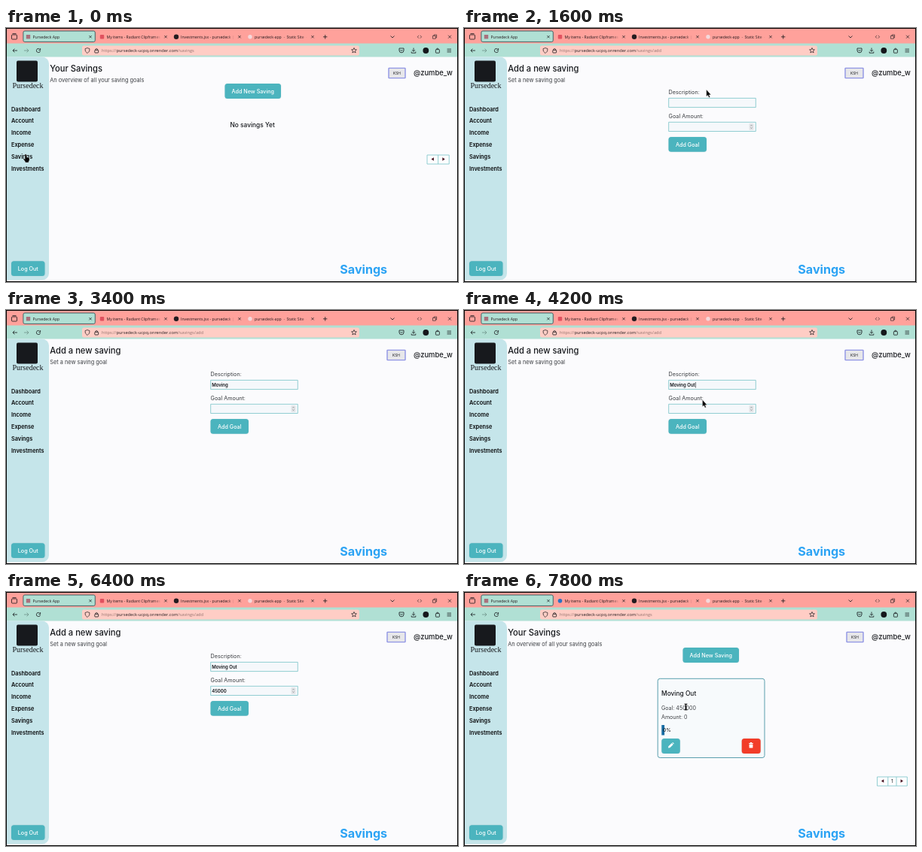
An HTML page with a canvas that plays this animation: 600x338 px, repeating every 8000 ms.

```html
<!DOCTYPE html>
<html lang="en">
<head>
<meta charset="utf-8">
<title>Savings walkthrough</title>
<style>
  html, body { margin: 0; width: 100%; height: 100%; overflow: hidden; background: #000; }
  canvas { display: block; width: 600px; height: 338px; }
</style>
</head>
<body>
<canvas id="stage"></canvas>
<script>
const W = 600, H = 338, LOOP = 8000, STEP = 200;
const canvas = document.getElementById('stage');
const ctx = canvas.getContext('2d');
const dpr = Math.max(1, window.devicePixelRatio || 1);
canvas.width = Math.round(W * dpr);
canvas.height = Math.round(H * dpr);

const UI = 'Inter, sans-serif';
const CHROME = '"Open Sans", "Noto Sans", sans-serif';
const C = {
  pink: '#ffa19b', bar: '#ffcdc5', mint: '#b0e0d4', side: '#c5e5ea', page: '#fbfbfd',
  teal: '#4bb4be', blue: '#176ca3', ink: '#16181c', soft: '#3c3f43',
  line: '#86c9cd', red: '#f23d29'
};
const HOST = 'pursedeck-ucpq.onrender.com';

// Pointer path: time, x, y
const PATH = [
  [0, 26, 169], [200, 26, 169], [800, 322, 80], [1400, 322, 80],
  [2400, 319.5, 99], [3800, 319.5, 99], [4200, 316.5, 119.5],
  [4600, 316, 131], [6400, 316, 131], [7200, 294.5, 153], [LOOP, 294.5, 153]
];

const clamp = (v, lo, hi) => Math.min(hi, Math.max(lo, v));
const between = (t, a, b) => t >= a && t < b;

function rect(x, y, w, h, fill, r = 0, stroke, lw = 1) {
  ctx.beginPath();
  ctx.roundRect(x, y, w, h, r);
  if (fill) { ctx.fillStyle = fill; ctx.fill(); }
  if (stroke) { ctx.strokeStyle = stroke; ctx.lineWidth = lw; ctx.stroke(); }
}

function disc(x, y, r, fill) {
  ctx.beginPath();
  ctx.arc(x, y, r, 0, Math.PI * 2);
  ctx.fillStyle = fill;
  ctx.fill();
}

function text(s, x, y, size, { color = C.ink, weight = 400, font = UI, align = 'left' } = {}) {
  ctx.font = `${weight} ${size}px ${font}`;
  ctx.textAlign = align;
  ctx.fillStyle = color;
  ctx.fillText(s, x, y);
  return ctx.measureText(s).width;
}

// Open or closed polyline from a flat list of coordinates
function poly(pts, { fill, stroke, lw = 0.8, close = false } = {}) {
  ctx.beginPath();
  for (let i = 0; i < pts.length; i += 2) ctx.lineTo(pts[i], pts[i + 1]);
  if (close) ctx.closePath();
  if (fill) { ctx.fillStyle = fill; ctx.fill(); }
  if (stroke) { ctx.strokeStyle = stroke; ctx.lineWidth = lw; ctx.stroke(); }
}

function arc(x, y, r, a, b, lw = 0.8) {
  ctx.beginPath();
  ctx.arc(x, y, r, a, b);
  ctx.strokeStyle = C.ink;
  ctx.lineWidth = lw;
  ctx.stroke();
}

function cross(x, y, r) {
  poly([x - r, y - r, x + r, y + r], { stroke: C.ink, lw: 0.7 });
  poly([x - r, y + r, x + r, y - r], { stroke: C.ink, lw: 0.7 });
}

function button(label, x, y, w, h, fill = C.teal) {
  ctx.save();
  ctx.shadowColor = 'rgba(40,110,125,.2)';
  ctx.shadowBlur = 1.5 * dpr;
  rect(x, y, w, h, fill, 3.5);
  ctx.restore();
  if (label) text(label, x + w / 2, y + h / 2 + 2.6, 7.2, { color: '#fff', weight: 500, align: 'center' });
}

function tab(title, x, end, icon) {
  icon(x);
  ctx.save();
  ctx.beginPath();
  ctx.rect(x + 5, 5, end - x - 5, 14);
  ctx.clip();
  const fade = ctx.createLinearGradient(end - 10, 0, end, 0);
  fade.addColorStop(0, '#24191c');
  fade.addColorStop(1, 'rgba(36,25,28,0)');
  text(title, x + 6, 13.9, 5.15, { color: fade, font: CHROME });
  ctx.restore();
  cross(end + 6, 11.7, 1.7);
}

function tabBar(t) {
  rect(1, 1, 598, 20, C.pink);
  rect(7.5, 9, 7, 6, null, 1, C.ink, 0.8);
  poly([8.5, 7.6, 13.5, 7.6], { stroke: C.ink });
  rect(22.9, 4, 95.4, 14.4, C.mint, 2, '#35575c', 0.9);
  tab('Pursedeck App', 29.5, 106, x => rect(x - 2.7, 9, 5.4, 5.4, '#a8707c'));
  tab('My items - Radiant Clipframes', 127.5, 206, x =>
    t < 7600 ? rect(x - 2.7, 9, 5.4, 5.4, '#e0525f', 1) : disc(x, 11.8, 2.8, '#2b72c4'));
  tab('Investments.jsx - pursedeck | Git', 226, 304, x => disc(x, 11.8, 3.2, '#231c20'));
  tab('pursedeck-app  ·  Static Site  ·', 324, 401, x => disc(x, 11.8, 2.7, '#f4d9dc'));
  poly([421, 11.8, 426.4, 11.8], { stroke: C.ink });
  poly([423.7, 9.1, 423.7, 14.5], { stroke: C.ink });
  poly([510.5, 10.5, 513, 13, 515.5, 10.5], { stroke: C.ink });
  poly([548, 9.9, 546.2, 11.8, 548, 13.7], { stroke: C.ink, lw: 0.6 });
  poly([549.8, 9.9, 551.6, 11.8, 549.8, 13.7], { stroke: C.ink, lw: 0.6 });
  rect(566.5, 10.4, 3.8, 3.8, null, 0, C.ink, 0.6);
  poly([568, 10.4, 568, 9, 571.6, 9, 571.6, 12.8, 570.3, 12.8], { stroke: C.ink, lw: 0.6 });
  cross(589, 11.7, 2);
}

function arrow(x, y, dir, color) {
  poly([x - 3 * dir, y, x + 3 * dir, y], { stroke: color });
  poly([x + 0.6 * dir, y - 2.4, x + 3 * dir, y, x + 0.6 * dir, y + 2.4], { stroke: color });
}

function toolBar(path) {
  rect(1, 20.5, 598, 18, C.mint);
  arrow(12, 30, -1, C.ink);
  arrow(27, 30, 1, '#6d9188');
  arc(43, 30, 2.6, 0.2, 5.4);
  poly([45.6, 27, 45.6, 29.4, 43.4, 29.4], { stroke: C.ink });
  rect(101, 23.5, 368, 13, C.bar, 2.5);
  poly([105, 27.6, 108, 26.5, 111, 27.6, 110.6, 31, 108, 33.6, 105.4, 31], { stroke: C.ink, lw: 0.7, close: true });
  rect(117.8, 29.4, 4.8, 3.6, null, 0.6, C.ink, 0.8);
  arc(120.2, 29.2, 1.6, Math.PI, 0);
  const grey = { color: '#94736f', font: CHROME };
  let x = 127;
  x += text('https://', x, 32.1, 5.7, grey);
  x += text(HOST, x, 32.1, 5.7, { color: '#2c2224', font: CHROME });
  text(path, x, 32.1, 5.7, grey);
  const star = [];
  for (let i = 0; i < 10; i++) {
    const r = i % 2 ? 1.6 : 3.6, a = i * Math.PI / 5 - Math.PI / 2;
    star.push(462 + r * Math.cos(a), 30 + r * Math.sin(a));
  }
  poly(star, { stroke: C.ink, lw: 0.7, close: true });
  poly([522, 30, 522, 27, 528, 27, 528, 30], { stroke: C.ink });
  arc(525, 29.8, 3, 0, Math.PI);
  poly([523.5, 29, 525, 30.6, 526.5, 29], { stroke: C.ink });
  poly([541, 26.5, 541, 31], { stroke: C.ink });
  poly([539, 29.2, 541, 31.2, 543, 29.2], { stroke: C.ink });
  poly([538.2, 31.5, 538.2, 33.2, 543.8, 33.2, 543.8, 31.5], { stroke: C.ink });
  disc(557.3, 30, 3.9, '#15171b');
  rect(570.4, 28.6, 5, 4.6, null, 0.6, C.ink, 0.8);
  arc(572.8, 28.4, 1.3, Math.PI, 0);
  for (let i = -1; i < 2; i++) poly([585.5, 30 + i * 2, 591, 30 + i * 2], { stroke: C.ink, lw: 0.7 });
}

function sideBar() {
  rect(1, 38.5, 56, 297, C.side, [0, 9, 9, 0]);
  rect(14, 43.5, 28, 28, '#17191d', 2);
  text('Pursedeck', 29, 79.8, 10, { font: '"Liberation Serif", serif', align: 'center' });
  ['Dashboard', 'Account', 'Income', 'Expense', 'Savings', 'Investments']
    .forEach((s, i) => text(s, 7, 110.5 + i * 15.8, 7.35, { color: '#090a0c', weight: 600 }));
  button('Log Out', 7, 310.3, 44.5, 19.8);
}

function header(title, sub, selectX) {
  text(title, 58.3, 58, 11.15, { weight: 500 });
  text(sub, 58.3, 72.2, 7.35, { color: C.soft });
  rect(selectX, 53.4, 530 - selectX, 13.2, '#e7e7ea', 0.5, '#8f94e4', 1.4);
  text('KSH', (selectX + 530) / 2, 61.8, 4.8, { align: 'center' });
  text('@zumbe_w', 541, 63.1, 9.4, { weight: 500 });
}

function pager(x, y, cells) {
  const total = cells.reduce((a, b) => a + b, 0);
  rect(x, y, total, 12, '#fdfdfe', 0, C.line, 0.9);
  let edge = x;
  cells.slice(0, -1).forEach(w => {
    edge += w;
    poly([edge, y, edge, y + 12], { stroke: C.line, lw: 0.9 });
  });
  const tri = (cx, d) => poly([cx - 1.6 * d, y + 3.2, cx + 1.8 * d, y + 5.5, cx - 1.6 * d, y + 7.8],
    { fill: '#451020', close: true });
  tri(x + cells[0] / 2, -1);
  tri(x + total - cells[cells.length - 1] / 2, 1);
  if (cells.length > 2) text('1', x + cells[0] + cells[1] / 2, y + 8.3, 6.6, { align: 'center' });
}

function card() {
  rect(257.2, 115.3, 141.8, 105.2, '#f7fafc', 3, '#5a9fae', 1);
  text('Moving Out', 262, 137.6, 8.4, { weight: 500 });
  text('Goal: 450000', 262, 157, 7.1, { color: C.soft });
  text('Amount: 0', 262, 169.3, 7.1, { color: C.soft });
  rect(262.3, 177, 3.8, 13.5, C.blue);
  text('0%', 264, 186, 6.8);
  button('', 262.3, 195, 24.5, 20);
  poly([271, 207.6, 271.5, 205.3, 275.8, 201, 277.7, 202.9, 273.4, 207.2], { fill: '#fff', close: true });
  poly([276.3, 200.5, 277.1, 199.9, 278.8, 201.6, 278.2, 202.4], { fill: '#fff', close: true });
  button('', 368.7, 195, 25, 20, C.red);
  rect(378.2, 201, 5.6, 1, '#fff');
  rect(379.9, 200, 2.2, 1, '#fff');
  rect(378.6, 202.6, 4.8, 5, '#fff', 0.7);
}

function field(label, y, value, focused) {
  text(label, 271.5, y - 5.8, 7.25, { color: C.soft });
  rect(271.7, y, 115.6, 12.2, '#f5f8fb', 0, C.line, 0.9);
  const w = text(value, 273.2, y + 8.4, 6, { weight: 600 });
  if (focused) rect(273.6 + w, y + 2.6, 0.6, 7.4, C.ink);
}

function spinner(x, y) {
  rect(x - 3, y - 4.5, 6, 9, '#e3e5e8', 1.2);
  poly([x - 1.2, y - 1, x, y - 2.3, x + 1.2, y - 1], { stroke: '#6a6c70', lw: 0.6 });
  poly([x - 1.2, y + 1, x, y + 2.3, x + 1.2, y + 1], { stroke: '#6a6c70', lw: 0.6 });
}

function listPage(t, saved) {
  const hover = between(t, 800, 1600);
  header('Your Savings', 'An overview of all your saving goals', saved || t < 400 ? 508 : 506);
  button('Add New Saving', 290.5, 74, 74.5, 20, hover ? C.blue : C.teal);
  if (saved) {
    card();
    pager(548.5, 246, [14.3, 11.2, 14.3]);
  } else {
    text('No savings Yet', 297.5, 132, 8.35, { weight: 500 });
    pager(559, 169, [14.6, 14.6]);
  }
}

function formPage(t) {
  const name = 'Moving Out'.slice(0, clamp(Math.floor((t - 2800) / 100), 0, 10));
  const goal = '450000'.slice(0, clamp(Math.floor((t - 4800) / 300), 0, 6));
  const caret = t % 1000 < 400;
  header('Add a new saving', 'Set a new saving goal', 506);
  field('Description:', 93.4, name, caret && between(t, 2800, 4600));
  field('Goal Amount:', 125.3, goal, caret && between(t, 4600, 7200));
  spinner(381.5, 131.4);
  button('Add Goal', 271.5, 145, 50.5, 19.8, t >= 7400 ? C.blue : C.teal);
}

function status() {
  rect(1, 328, 124.5, 8.5, '#3b3b41', [0, 2, 0, 0]);
  text('https://' + HOST + '/savings/add', 4, 334.1, 4.95, { color: '#f4f4f6', font: CHROME });
}

function pointerAt(t) {
  const i = PATH.findIndex(k => k[0] > t);
  const [t0, x0, y0] = PATH[i - 1], [t1, x1, y1] = PATH[i];
  const u = (t - t0) / (t1 - t0), e = u * u * (3 - 2 * u);
  return [x0 + (x1 - x0) * e, y0 + (y1 - y0) * e];
}

function pointerKind(x, y, form, saved) {
  const inside = (a, b, c, d) => x >= a && x <= c && y >= b && y <= d;
  if (form) {
    if (inside(271, 145, 322, 165)) return 'hand';
    return inside(271, 93, 376, 106) || inside(271, 125, 376, 138) ? 'beam' : 'arrow';
  }
  if (saved) return 'beam';
  return inside(290, 74, 365, 94) || inside(7, 103, 50, 190) ? 'hand' : 'arrow';
}

function pointer(x, y, kind) {
  ctx.save();
  ctx.translate(x, y);
  ctx.lineJoin = 'round';
  const edge = { fill: '#050506', stroke: 'rgba(255,255,255,.65)', lw: 0.5, close: true };
  if (kind === 'hand') {
    poly([-1, -0.8, 0.4, -1.2, 1.2, -0.2, 1.4, 3, 3.4, 3.2, 5, 4, 5.2, 6.8,
      4.2, 8.4, 4, 10, -0.2, 10, -0.8, 8.4, -3, 5.6, -2.4, 4.6, -0.8, 5.4], edge);
  } else if (kind === 'beam') {
    poly([-1.9, -3.8, 1.9, -3.8], { stroke: '#050506', lw: 1.1 });
    poly([-1.9, 3.8, 1.9, 3.8], { stroke: '#050506', lw: 1.1 });
    poly([0, -3.8, 0, 3.8], { stroke: '#050506', lw: 1.3 });
  } else {
    poly([0, 0, 0, 9, 2, 7.4, 3.4, 10.6, 4.9, 9.9, 3.5, 6.9, 6, 6.7], edge);
  }
  ctx.restore();
}

function draw(t) {
  const form = between(t, 1600, 7600), saved = t >= 7600;
  ctx.setTransform(dpr, 0, 0, dpr, 0, 0);
  rect(0, 0, W, H, '#000');
  rect(1, 38, 598, 299, C.page);
  tabBar(t);
  toolBar(form ? '/savings/add' : '/savings');
  sideBar();
  if (form) formPage(t); else listPage(t, saved);
  if (between(t, 800, 1600)) status();
  text('Savings', 443.3, 327.3, 16.1, { color: '#2ba3f4', weight: 700 });
  const typing = between(t, 3000, 4000) || between(t, 5000, 6600);
  if (!typing) {
    const [x, y] = pointerAt(t);
    pointer(x, y, pointerKind(x, y, form, saved));
  }
}

function tick() {
  draw(Math.floor((performance.now() % LOOP) / STEP) * STEP);
  requestAnimationFrame(tick);
}
tick();
</script>
</body>
</html>
```
